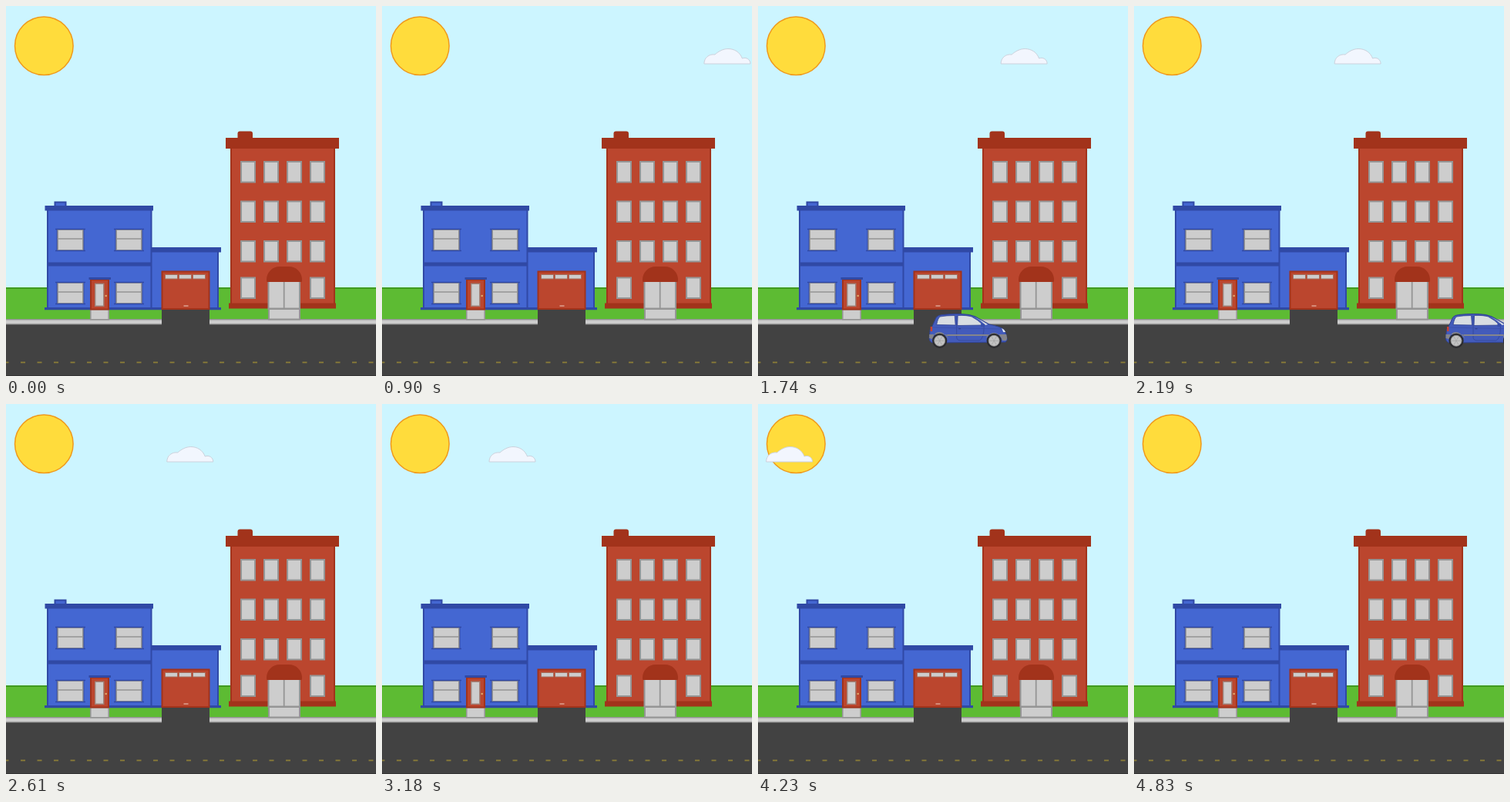
Recreate the animation shown at these times as an HTML page with a canvas. Size 480 by 480 pixels, loop 5400 ms.

```html
<!DOCTYPE html>
<html lang="en">
<head>
<meta charset="utf-8">
<title>Street scene</title>
<style>
html, body { margin: 0; width: 100%; height: 100%; overflow: hidden; background: #ccf5ff; }
canvas { display: block; width: 100%; height: 100%; }
</style>
</head>
<body>
<canvas id="stage" width="480" height="480"></canvas>
<script>
const ctx = document.getElementById('stage').getContext('2d');
const LOOP = 5400, STEP = 30;
const BLUE = '#4467d2', NAVY = '#3049a5', RED = '#bb462e', RUST = '#a2331b';
const PALE = '#cdcdcd', GRAY = '#959595', ROAD = '#424242';

function paint(fill, stroke, width = 2) {
  if (fill) { ctx.fillStyle = fill; ctx.fill(); }
  if (stroke) { ctx.strokeStyle = stroke; ctx.lineWidth = width; ctx.stroke(); }
}

// Rectangle given by its outer edges; the border lies inside them.
function box(x1, y1, x2, y2, fill, stroke, width = 2) {
  const h = stroke ? width / 2 : 0;
  ctx.beginPath();
  ctx.rect(x1 + h, y1 + h, x2 - x1 - 2 * h, y2 - y1 - 2 * h);
  paint(fill, stroke, width);
}

function disc(x, y, r, fill, stroke, width) {
  ctx.beginPath();
  ctx.arc(x, y, r, 0, 2 * Math.PI);
  paint(fill, stroke, width);
}

function line(x1, y1, x2, y2, color, width) {
  ctx.beginPath();
  ctx.moveTo(x1, y1);
  ctx.lineTo(x2, y2);
  paint(null, color, width);
}

function shape(d, fill, stroke, width) {
  const p = new Path2D(d);
  if (fill) { ctx.fillStyle = fill; ctx.fill(p); }
  if (stroke) { ctx.strokeStyle = stroke; ctx.lineWidth = width; ctx.stroke(p); }
}

function ground() {
  box(0, 0, 480, 480, '#ccf5ff');
  disc(49.3, 51.7, 37.8, '#ffdc3c', '#f09a1c', 1.5);
  box(0, 365, 480, 408, '#5dbb33');
  box(0, 365, 480, 367, '#3f9a1f');
  box(0, 406, 480, 414, PALE);
  box(0, 406, 480, 407.5, GRAY);
  box(0, 412, 480, 414, GRAY);
  box(0, 414, 480, 480, ROAD);
  box(0, 413.4, 480, 414.6, '#383838');
  box(0, 479, 480, 480, '#343434');
  for (let x = -2.5; x < 480; x += 21.5) box(x, 461.5, x + 6, 463.3, '#8b7c37');
}

function sashWindow(x, y) {
  box(x - 1, y - 1, x + 34, y + 28, PALE, GRAY);
  line(x, y + 12, x + 33, y + 12, GRAY, 1.6);
  for (const side of [x - 1, x + 34]) line(side, y - 1, side, y + 28, NAVY, 1);
  for (const edge of [y - 0.5, y + 27.5]) line(x - 3, edge, x + 36, edge, NAVY, 1.4);
}

function blueHouse() {
  box(187, 315, 276, 394, BLUE, NAVY);
  box(188, 313, 279, 319.5, NAVY);
  box(62.5, 253.5, 78.5, 262, BLUE, NAVY);
  box(53, 262, 189.5, 394, BLUE, NAVY);
  box(50.5, 259, 191, 265.5, NAVY);
  box(54, 332.5, 188, 337.5, NAVY);
  for (const x of [67, 143]) for (const y of [290, 359]) sashWindow(x, y);
  box(50, 391, 279, 394.3, NAVY);

  box(109, 393, 134, 407.5, PALE, GRAY, 1.6);
  box(109, 354, 134, 394.5, RED, RUST);
  box(107.5, 352, 136, 355, NAVY);
  box(115, 359.5, 127.5, 390, PALE, '#a08077', 1.4);
  disc(129.7, 376, 1.2, '#e0b070');

  box(202, 393, 264, 415, ROAD);
  box(201.5, 343.5, 264.5, 394, RED, RUST);
  for (let x = 206; x < 250; x += 18) box(x, 348, x + 17, 354.5, PALE, '#a5705f', 1);
  box(230.5, 388.3, 236.5, 389.8, '#dfa493');
}

function redBlock() {
  ctx.beginPath();
  ctx.roundRect(300.5, 162.5, 19.5, 14, 3);
  paint(RUST);
  box(291, 180, 427, 391, RED, RUST);
  box(285, 171, 432, 185, RUST);
  box(289, 385.5, 428, 392.5, RUST);
  [201, 252.5, 304, 351.5].forEach((y, row) => {
    for (let col = 0; col < 4; col++) {
      if (row === 3 && col % 3) continue;
      const x = 304 + 30 * col;
      box(x, y, x + 20, y + 28.5, PALE, GRAY);
    }
  });
  box(339.5, 354, 382, 394, PALE, GRAY);
  line(360.7, 356, 360.7, 392, GRAY, 1.8);
  ctx.beginPath();
  ctx.roundRect(338, 338, 46, 20, [17, 17, 1, 1]);
  paint(RUST);
  box(340, 391.5, 382, 407.5, PALE, GRAY);
  line(340, 393, 382, 393, GRAY, 2);
}

function cloud(x) {
  ctx.save();
  ctx.translate(x, 55);
  shape('M.5 20C.5 12 7 7 14.5 8C19 4 25 .5 31.500 .5C40 .5 47 5 50 13C55 11 60.500 14 60.500 20Z',
    '#f2f6fe', '#cbd1dc', 1);
  ctx.restore();
}

function wheel(x) {
  disc(x, 35.3, 9.6, '#2b2b2e');
  disc(x, 35.3, 7, '#c2c2c2', '#8e8e8e', 0.8);
  for (let k = 0; k < 6; k++) {
    const a = k * Math.PI / 3;
    line(x + 2 * Math.cos(a), 35.3 + 2 * Math.sin(a),
      x + 6 * Math.cos(a), 35.3 + 6 * Math.sin(a), '#a4a4a4', 0.8);
  }
  disc(x, 35.3, 1.6, '#a9a9a9');
}

function car(x) {
  ctx.save();
  ctx.translate(x, 399);
  shape('M1 32L2 21L5 16L10 5Q12 2 18 1.500Q38 -.5 53 1.500Q61 3 68 8L79 14Q94 17 98 21Q101 25 102 34L100 37L6 38Q1 37 1 32Z',
    '#435bbb', '#30428f', 1);
  shape('M10.500 14.500Q12 6 15 4Q23 2.500 34 2.500L35 15Z', '#d8dde2', '#30428f', 0.8);
  shape('M37.500 15.500L38 2.500Q50 2 56 4Q64 8 71 15Z', '#d8dde2', '#30428f', 0.8);
  shape('M60 4.500Q69 9 77 14L74 15Q67 8 60 4.500Z', '#d8dde2');
  shape('M36.500 3V31Q37 35 42 35H66Q72 33 72 16', null, '#334799', 0.8);
  line(5, 18, 95, 20, '#3a50aa', 0.8);
  shape('M1 27H23L25 31L26 33Q20 24 14 24Q7 24 5 33L1 32Z', '#85858b');
  line(24, 28, 76, 28, '#85858b', 2);
  shape('M76 27H101L102 32L101 35H96Q92 25 85 25Q78 25 75 33Z', '#85858b');
  box(2.5, 17, 5, 23, '#c74432');
  shape('M95 19L98 21L100 24L97 24Z', '#e7ebf1');
  box(39, 19, 42, 20.3, '#2f4190');
  shape('M68 13H72Q74 16 72 17H68Z', '#374eaa');
  wheel(14.5);
  wheel(85);
  ctx.restore();
}

function draw(t) {
  ground();
  blueHouse();
  redBlock();
  const cloudX = 366 - 0.1223 * (t - 1320);
  const carX = 51 + 0.4052 * (t - 1320);
  if (cloudX < 480 && cloudX > -61) cloud(cloudX);
  if (carX < 480 && carX > -103) car(carX);
}

const start = performance.now();
function tick() {
  const t = (performance.now() - start) % LOOP;
  draw(Math.floor(t / STEP) * STEP);
  requestAnimationFrame(tick);
}
tick();
</script>
</body>
</html>
```
